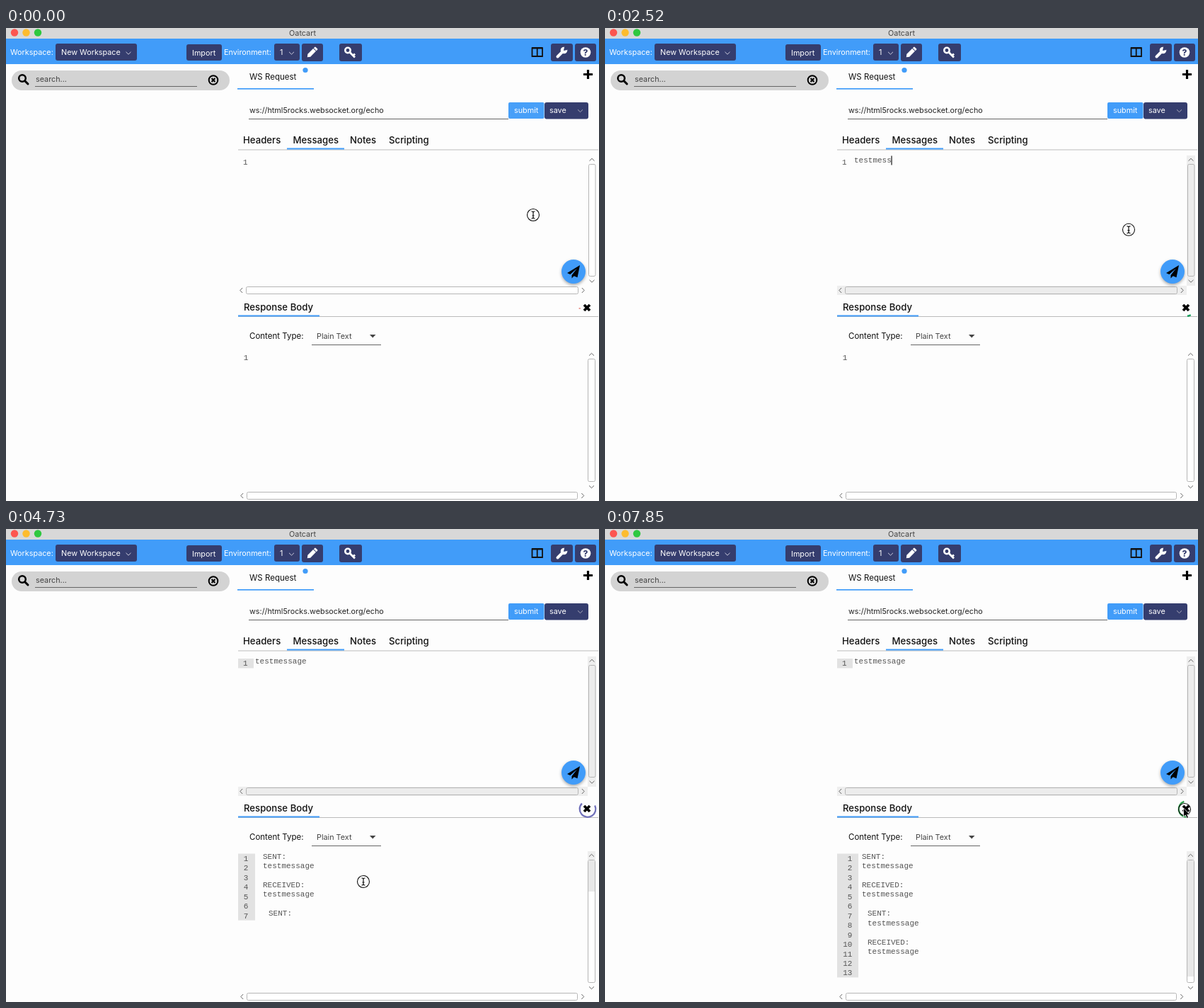
Write an HTML page that moves like this. It is 838 by 668 pixels and loops after 8 s.

```html
<!DOCTYPE html>
<html lang="en">
<head>
<meta charset="utf-8">
<title>WebSocket request</title>
<style>
  html, body { margin: 0; width: 100%; height: 100%; overflow: hidden; background: #fdfdfd; }
  svg { display: block; width: 100%; height: 100%; }
  text { font: 10.8px Inter, "Open Sans", sans-serif; fill: #222; white-space: pre; }
  .light text { fill: #fff; }
  .tabs text { font-size: 13.2px; font-weight: 500; fill: #111; }
  text.mid { font-size: 11.5px; fill: #111; }
  .code text { font: 11px "Liberation Mono", monospace; fill: #555; }
  .dark { fill: #353d6e; }
  .blue { fill: #419cf9; }
  .line { fill: none; stroke: #666; }
  .thumb { fill: #fff; stroke: #b5b5b5; }
  .focused .thumb { fill: #ececec; }
  .track { fill: #eee; visibility: hidden; }
  .focused .track { visibility: visible; }
  .fab { filter: drop-shadow(0 2px 2px #0005); }
</style>
</head>
<body>
<svg viewBox="0 0 838 668">
  <defs>
    <path id="chev" d="M-3.5-1.7 0 1.7 3.5-1.7" fill="none"/>
    <path id="cross" d="M-4-4 4 4M4-4-4 4" fill="none"/>
  </defs>
  <rect width="838" height="668" fill="#fdfdfd"/>

  <!-- window and toolbar -->
  <rect width="838" height="15" fill="#d8d8d8"/>
  <circle cx="12" cy="6.5" r="5.2" fill="#fc5650"/>
  <circle cx="28.500" cy="6.500" r="5.200" fill="#fdbc2e"/>
  <circle cx="45" cy="6.500" r="5.200" fill="#2fc840"/>
  <text x="419" y="11" text-anchor="middle" style="fill:#444">Oatcart</text>
  <rect class="blue" y="15" width="838" height="36"/>
  <g class="dark">
    <rect x="70" y="22" width="115" height="24" rx="3"/>
    <rect x="255" y="23" width="50" height="23" rx="3"/>
    <rect x="379" y="22" width="36" height="24" rx="3"/>
    <rect x="418" y="22" width="30" height="25" rx="3"/>
    <rect x="471" y="22" width="32" height="25" rx="3"/>
    <rect x="770" y="22" width="31" height="25" rx="3"/>
    <rect x="804" y="22" width="30" height="25" rx="3"/>
  </g>
  <g class="light">
    <text x="6" y="38">Workspace:</text>
    <text x="78" y="38">New Workspace</text>
    <text x="263" y="38.500">Import</text>
    <text x="308" y="38">Environment:</text>
    <text x="387" y="38">1</text>
  </g>
  <g stroke="#ccd">
    <use href="#chev" x="173" y="35.500"/>
    <use href="#chev" x="403.500" y="35.500"/>
  </g>
  <g fill="#fff">
    <path transform="translate(432.500 34.500) rotate(45)" d="M-2.700-5V6L0 9.500 2.700 6V-5ZM-2.700-6V-8Q-2.700-9-1.700-9H1.700Q2.700-9 2.700-8V-6Z"/>
    <circle cx="483" cy="31.500" r="3.700" fill="none" stroke="#fff" stroke-width="2.600"/>
    <path d="M486 34.500 493 41.500M490.500 39 493 36.500" stroke="#fff" stroke-width="2.800"/>
    <path d="M779.500 40.500 787 33" stroke="#fff" stroke-width="4" stroke-linecap="round"/>
    <circle cx="788.500" cy="31.500" r="4.800"/>
    <path class="dark" d="M788 32 789 27 793 25 795 27 793 31Z"/>
    <circle cx="819" cy="34.500" r="7.300"/>
  </g>
  <text x="819" y="39" text-anchor="middle" style="font-size:12px;font-weight:800;fill:#353d6e">?</text>
  <path d="M743.500 28.500H758V40H743.500ZM750.700 28V40M743 28H758.500" fill="none" stroke="#111" stroke-width="1.800"/>

  <!-- search -->
  <rect x="8" y="60" width="308" height="28" rx="14" fill="#d3d3d3"/>
  <circle cx="23" cy="71" r="4.800" fill="none" stroke="#000" stroke-width="2.500"/>
  <path d="M26.500 74.500 31 79" stroke="#000" stroke-width="3" stroke-linecap="round"/>
  <text x="42" y="76" style="fill:#444">search...</text>
  <path class="line" d="M41 82.500H270"/>
  <circle cx="293" cy="73.500" r="6.300" fill="none" stroke="#000" stroke-width="2"/>
  <use href="#cross" transform="translate(293 73.500) scale(.6)" stroke="#000" stroke-width="3.600"/>

  <!-- request -->
  <text class="mid" x="344" y="73">WS Request</text>
  <circle class="blue" cx="423" cy="59.500" r="3.600"/>
  <rect class="blue" x="327" y="85" width="108" height="1.700"/>
  <path d="M822.500 59V72M816 65.500H829" stroke="#000" stroke-width="3.200"/>
  <text x="344" y="120">ws://html5rocks.websocket.org/echo</text>
  <path class="line" d="M343 128.500H710"/>
  <rect id="submit" class="blue" x="710" y="105" width="50.500" height="23" rx="2"/>
  <rect class="dark" x="761" y="105" width="62" height="23.500" rx="3"/>
  <g class="light"><text x="718" y="120">submit</text><text x="768" y="120">save</text></g>
  <use href="#chev" x="811.500" y="117" stroke="#aab"/>
  <g class="tabs">
    <text x="335" y="163">Headers</text>
    <text x="405.500" y="163">Messages</text>
    <text x="486" y="163">Notes</text>
    <text x="541" y="163">Scripting</text>
    <text x="336" y="398.500">Response Body</text>
  </g>
  <path d="M328 172H837M328 407.500H837" stroke="#bbb"/>
  <rect class="blue" x="397" y="169.500" width="81" height="2"/>
  <rect class="blue" x="328" y="405.500" width="115" height="2"/>

  <!-- message editor -->
  <g id="editor">
    <rect class="track" x="822" y="180" width="12" height="184"/>
    <rect class="track" x="328" y="364" width="494" height="13"/>
    <rect class="thumb" x="823.500" y="192.500" width="9.500" height="158" rx="2"/>
    <rect class="thumb" x="339.500" y="365.500" width="469" height="10" rx="2"/>
  </g>
  <g stroke="#666">
    <use href="#chev" transform="translate(828 186) scale(1 -1)"/>
    <use href="#chev" x="828" y="357.500"/>
    <use href="#chev" transform="translate(332.500 370.500) rotate(90)"/>
    <use href="#chev" transform="translate(815.500 370.500) rotate(-90)"/>
  </g>
  <rect id="mark" x="328" y="183" width="22" height="13.500" fill="#e2e2e2"/>
  <g class="code">
    <text x="335" y="193">1</text>
    <text id="message" x="352" y="190"></text>
  </g>
  <rect id="caret" y="180.500" width="1.100" height="13" fill="#000"/>
  <circle class="blue fab" cx="802" cy="344" r="17"/>
  <path d="M811 335 793 346 797.300 348 807 339.500 799.500 349V353.500L802.700 350.300 807.500 352.300Z"/>

  <!-- response -->
  <text class="mid" x="344" y="439">Content Type:</text>
  <text x="439" y="439" style="fill:#444">Plain Text</text>
  <path class="line" d="M432 447.500H530"/>
  <path d="M514 433H522.500L518.200 437.500Z" fill="#444"/>
  <rect class="thumb" x="822.500" y="467.500" width="10" height="173" rx="2"/>
  <g id="fresh">
    <rect x="822" y="455" width="11" height="12" fill="#eee"/>
    <rect id="filled" x="823" y="468" width="9" fill="#e8e8e8"/>
  </g>
  <rect class="thumb" x="340.500" y="655.500" width="467" height="10" rx="2"/>
  <g stroke="#666">
    <use href="#chev" transform="translate(827.500 461) scale(1 -1)"/>
    <use href="#chev" x="827.500" y="648"/>
    <use href="#chev" transform="translate(333.500 660.500) rotate(90)"/>
    <use href="#chev" transform="translate(815 660.500) rotate(-90)"/>
  </g>
  <rect id="gutter" x="328" y="458.500" fill="#e2e2e2"/>
  <g id="log" class="code"></g>
  <use href="#cross" x="821" y="395" stroke="#000" stroke-width="3.800"/>
  <path id="spinner" fill="none" stroke-width="2.300"/>

  <g id="pointer" fill="none" stroke="#111">
    <circle r="8.500" stroke-width="1.100"/>
    <path id="beam" d="M-2.500-5Q0-5 0-3.500Q0-5 2.500-5M0-4V4M-2.500 5Q0 5 0 3.500Q0 5 2.500 5M-1.500 1H1.500" stroke-width="1.200"/>
    <path id="arrow" d="M-1.500-2V10.500L1.300 8 3.300 12.500 5.500 11.500 3.600 7.200H7.500Z" fill="#000" stroke="#fff" stroke-width=".8"/>
  </g>
</svg>
<script>
const $ = id => document.getElementById(id);
const set = (el, attrs) => { for (const k in attrs) el.setAttribute(k, attrs[k]); };
const show = (el, on) => { el.style.visibility = on ? 'visible' : 'hidden'; };

const LOOP = 8000, STEP = 148, LINE = 13.45;
const FOCUS = 3, TYPE = 9, SENT = 26;
const MESSAGE = 'testmessage';
const GROWTH = [[40, 13], [38, 10], [29, 7], [SENT, 4]];

// [time, seconds into the spinner's cycle]
const SPIN = [[0, 0], [750, .7], [2520, 2.17], [3550, 2.9], [4730, 3.7], [6510, 5.32], [7850, 6.35], [8000, 6.47]];
// [time, x, y]
const PATH = [[0, 745, 264], [300, 741, 280], [750, 740, 284], [2900, 740, 285], [3330, 797, 340],
  [3900, 797, 340], [4500, 505, 498], [4800, 505, 498], [5350, 797, 340], [5850, 797, 340],
  [6350, 667, 452], [6550, 667, 452], [6950, 672, 255], [7150, 690, 237], [7500, 775, 320],
  [7750, 819, 396], [8000, 819, 396]];
// start angle and length of the arc within one turn
const ARC = [[0, 0, 5], [.4, 45, 250], [.7, 90, 250], [1.1, 390, 5]];
const COLORS = [[219, 68, 55], [244, 180, 0], [15, 157, 88], [66, 133, 244]];

function track(keys, t) {
  let i = 1;
  while (i < keys.length - 1 && t > keys[i][0]) i++;
  const a = keys[i - 1], b = keys[i];
  const p = Math.min(1, (t - a[0]) / (b[0] - a[0]));
  return a.slice(1).map((v, k) => v + (b[k + 1] - v) * p);
}

function addText(x, y, row, content) {
  const el = document.createElementNS($('log').namespaceURI, 'text');
  set(el, { x, y });
  el.textContent = content;
  $('log').append(el);
  return { el, row };
}

const numbers = Array.from({ length: 13 }, (_, i) => addText(0, 469 + i * LINE, i, i + 1));
const entries = ['SENT:', 'RECEIVED:', 'SENT:', 'RECEIVED:'].flatMap((label, i) =>
  [label, MESSAGE].map((s, k) => {
    const row = i * 3 + k;
    return addText(i < 2 ? 363 : 371, 465.5 + row * LINE, row, s);
  }));

function drawSpinner(t) {
  const [phase] = track(SPIN, t);
  const turn = Math.floor(phase / 1.1), part = phase - turn * 1.1;
  const [offset, length] = track(ARC, part);
  const start = 180 + turn * 90 + offset;
  const at = deg => {
    const a = deg * Math.PI / 180;
    return `${822 + 11.3 * Math.cos(a)} ${395.5 - 11.3 * Math.sin(a)}`;
  };
  const p = part / 1.1, ease = p * p * (3 - 2 * p);
  const from = COLORS[turn % 4], to = COLORS[(turn + 1) % 4];
  set($('spinner'), {
    d: `M${at(start)}A11.3 11.3 0 ${+(length > 180)} 0 ${at(start + length)}`,
    stroke: `rgb(${from.map((c, i) => Math.round(c + (to[i] - c) * ease))})`
  });
}

function drawPointer(t) {
  const [x, y] = track(PATH, t);
  const overText = x > 350 && x < 785 && (y > 180 && y < 364 || y > 458 && y < 652);
  set($('pointer'), { transform: `translate(${x} ${y})` });
  show($('beam'), overText);
  show($('arrow'), !overText);
}

function drawEditor(step, t) {
  const typed = Math.max(0, Math.min(MESSAGE.length, step - TYPE));
  const typing = typed > 0 && typed < MESSAGE.length;
  const blink = (t - FOCUS * STEP) % 1000 < 500;
  $('editor').classList.toggle('focused', step >= FOCUS);
  $('submit').style.fill = step < FOCUS ? '#479ff8' : '';
  $('message').textContent = MESSAGE.slice(0, typed);
  set($('caret'), { x: 351.7 + typed * 6.6 });
  show($('caret'), step >= FOCUS && step < SENT && (typing || blink));
  show($('mark'), step >= SENT);
}

function drawLog(step) {
  const rows = (GROWTH.find(g => step >= g[0]) || [0, 0])[1];
  const wide = rows >= 10;
  set($('gutter'), { width: wide ? 30 : 24, height: rows * LINE });
  set($('filled'), { height: wide ? 164 : 44 });
  show($('fresh'), rows > 0);
  numbers.forEach(({ el, row }) => {
    set(el, { x: (wide ? 349.4 : 342.4) - (row > 8 ? 13.2 : 6.6) });
    show(el, row < Math.max(1, rows));
  });
  entries.forEach(({ el, row }) => show(el, row < rows));
}

function frame() {
  const step = Math.min(53, Math.floor((performance.now() % LOOP + 10) / STEP));
  const t = step * STEP;
  drawSpinner(t);
  drawPointer(t);
  drawEditor(step, t);
  drawLog(step);
  requestAnimationFrame(frame);
}
frame();
</script>
</body>
</html>
```
